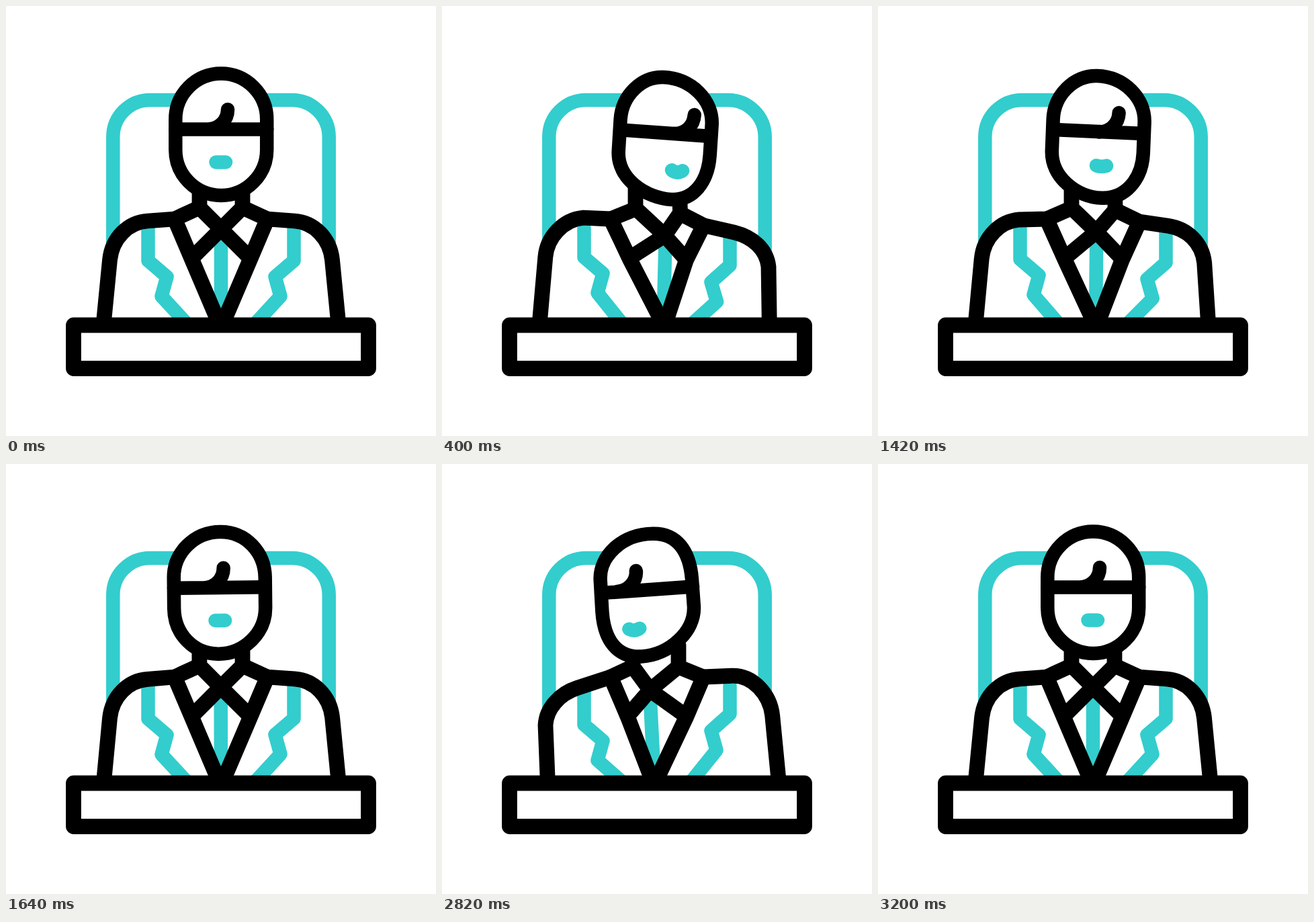
Recreate the animation shown at these times as an HTML page. Size 640 px wide and 640 px high, loop 3600 ms.

```html
<!DOCTYPE html>
<html lang="en">
<head>
<meta charset="utf-8">
<title>Speaker at a desk</title>
<style>
  html, body { margin: 0; width: 100%; height: 100%; overflow: hidden; background: #fff; }
  svg { display: block; width: 100%; height: 100%; }
  path, rect { fill: none; stroke-linejoin: round; stroke-linecap: round; }
  .ink { stroke: #000; stroke-width: 22.8; }
  .thin { stroke: #000; stroke-width: 20.5; }
  .teal { stroke: #33cdcd; stroke-width: 20.5; }
  .fill { fill: #fff; }
</style>
</head>
<body>
<svg viewBox="0 0 640 640">
  <path class="teal" stroke-linecap="butt" d="M159.3 362V195A55 55 0 0 1 214.3 140H425.7A55 55 0 0 1 480.7 195V362"/>
  <path id="torso" class="fill"/>
  <path id="notches" class="teal"/>
  <path id="tie" class="teal"/>
  <path id="outline" class="ink"/>
  <path id="collar" class="ink" style="stroke-linecap:round"/>
  <path id="lapels" class="ink"/>
  <path id="head" class="thin fill"/>
  <path id="hair" class="thin"/>
  <path id="mouth" class="teal"/>
  <rect class="ink fill" x="100.5" y="475" width="439" height="64.5"/>
</svg>
<script>
const LOOP = 3600;

// Each part has three poses: centre, right, left. "|" marks the open neck.
const parts = {
  body: [
    'M145 475 L154.5 378 C158 345 182 322 210.5 320 L251 317 L288 300 | 352 300 L389 317 L429.5 320 C458 322 482 345 485.5 378 L495 475',
    'M145 475 L153.8 374 C156.5 343 181 318 210.5 315.2 L251 317 L288 302 | 354 308.5 L389 326.5 L435 337 C463 344 483 362 486 388 L487.3 475',
    'M157.5 475 L154 389 C155 364 175 342 201 333.5 L251 317 L284 301.5 | 352 302 L389 317 L431 315.2 C463 314 488 343 491.7 374 L501.5 475'
  ],
  notches: [
    'M211.5 330 L211.5 379 L239.5 403 L231.5 432 L271 475 M428.5 330 L428.5 379 L400.5 403 L408.5 432 L369 475',
    'M211.5 330 L211.5 374 L239.5 398 L231.5 427 L270 475 M428.5 335 L428.5 386 L400.5 411 L409 440 L370 475',
    'M211.5 335 L211.5 388 L239.5 412 L231.5 441 L270 475 M428.5 330 L428.5 372 L400.5 397 L408.5 426 L369 475'
  ],
  tie: ['M320 340 L320 470', 'M332.5 350 L329.5 470', 'M309.5 345 L316 470'],
  collar: [
    'M288 270 L288 300 L320 332 L362 374 M352 270 L352 300 L320 332 L278 374',
    'M288 270 L288 301 L331 341 L363 377 M353.5 275 L354.5 308 L331 342 L281 374',
    'M284 282 L284 301.5 L310 337 L363 375 M352 270 L352 301.5 L310 336 L278 373'
  ],
  lapels: [
    'M251 317 L276.5 377 L319.5 478 M389 317 L363.5 377 L320.5 478',
    'M251 317 L280 378 L331 477 M389 327 L363.5 378 L331 477',
    'M251 317 L277 378 L315 477 M389 317 L363 378 L316 477'
  ],
  head: [
    'M252.3 168.5 C252.3 131 282.7 100.5 320.2 100.5 C357.7 100.5 388.2 131 388.2 168.5 L388.2 214 C388.2 251.5 357.7 282 320.2 282 C282.7 282 252.3 251.5 252.3 214 Z',
    'M265.7 168 C268.3 133 297 104.5 330 106 C371 108 404 140 401.6 177.5 L398.7 222 C396 262 374 290 341 288 C305 286 260 258 262.8 215 Z',
    'M235.6 173 C233.5 138 268 103.5 314 103.7 C350 103 368.5 130 371.8 171 L374.8 212 C376.5 250 338 284 297 286.5 C260 289 241 261 238.3 220 Z'
  ],
  hair: [
    'M252.3 183.4 L388.2 183.4 M330 154 C330 170.6 316.6 183.4 300 183.4',
    'M266 184.4 L400 194 M375.7 162 C374.8 178.5 361.5 191 345 190',
    'M237 192.2 L373 182.5 M288.5 159 C289.8 175 277 188.5 260.5 190'
  ],
  mouth: [
    'M312.5 232.5 Q320 232.5 327 232.5',
    'M342 244.3 Q350 250.5 358 245.2',
    'M278.2 245.8 Q286 250 294 244.8'
  ]
};

// Keys are [ms, lean]: 1 is right, -1 is left.
const bodyKeys = [[0, 0], [400, 1], [1200, 1], [1600, 0], [2000, -1], [2800, -1], [3200, 0], [LOOP, 0]];
const headKeys = bodyKeys.filter(([ms]) => ms !== 1600);

const smooth = u => u * u * (3 - 2 * u);

function leanAt(keys, t) {
  const i = keys.findIndex(([ms]) => ms > t);
  const [t0, a] = keys[i - 1], [t1, b] = keys[i];
  return a + (b - a) * smooth((t - t0) / (t1 - t0));
}

function pose(name, lean) {
  const [centre, right, left] = parts[name];
  const goal = (lean > 0 ? right : left).split(' ');
  const amount = Math.abs(lean);
  return centre.split(' ').map((token, i) => {
    const [, cmd, num] = token.match(/^([A-Z|]?)(.*)$/);
    if (!num) return cmd;
    const from = +num, to = +goal[i].replace(/^[A-Z]/, '');
    return cmd + (from + (to - from) * amount).toFixed(2);
  }).join(' ');
}

const setPath = (id, d) => document.getElementById(id).setAttribute('d', d);

function draw(t) {
  const bodyLean = leanAt(bodyKeys, t), headLean = leanAt(headKeys, t);
  const body = pose('body', bodyLean);
  setPath('torso', body.replace('|', 'L'));
  setPath('outline', body.replace('|', 'M'));
  for (const id of ['notches', 'tie', 'collar', 'lapels', 'mouth']) setPath(id, pose(id, bodyLean));
  for (const id of ['head', 'hair']) setPath(id, pose(id, headLean));
}

const start = performance.now();
function tick() {
  draw((performance.now() - start) % LOOP);
  requestAnimationFrame(tick);
}
tick();
</script>
</body>
</html>
```
